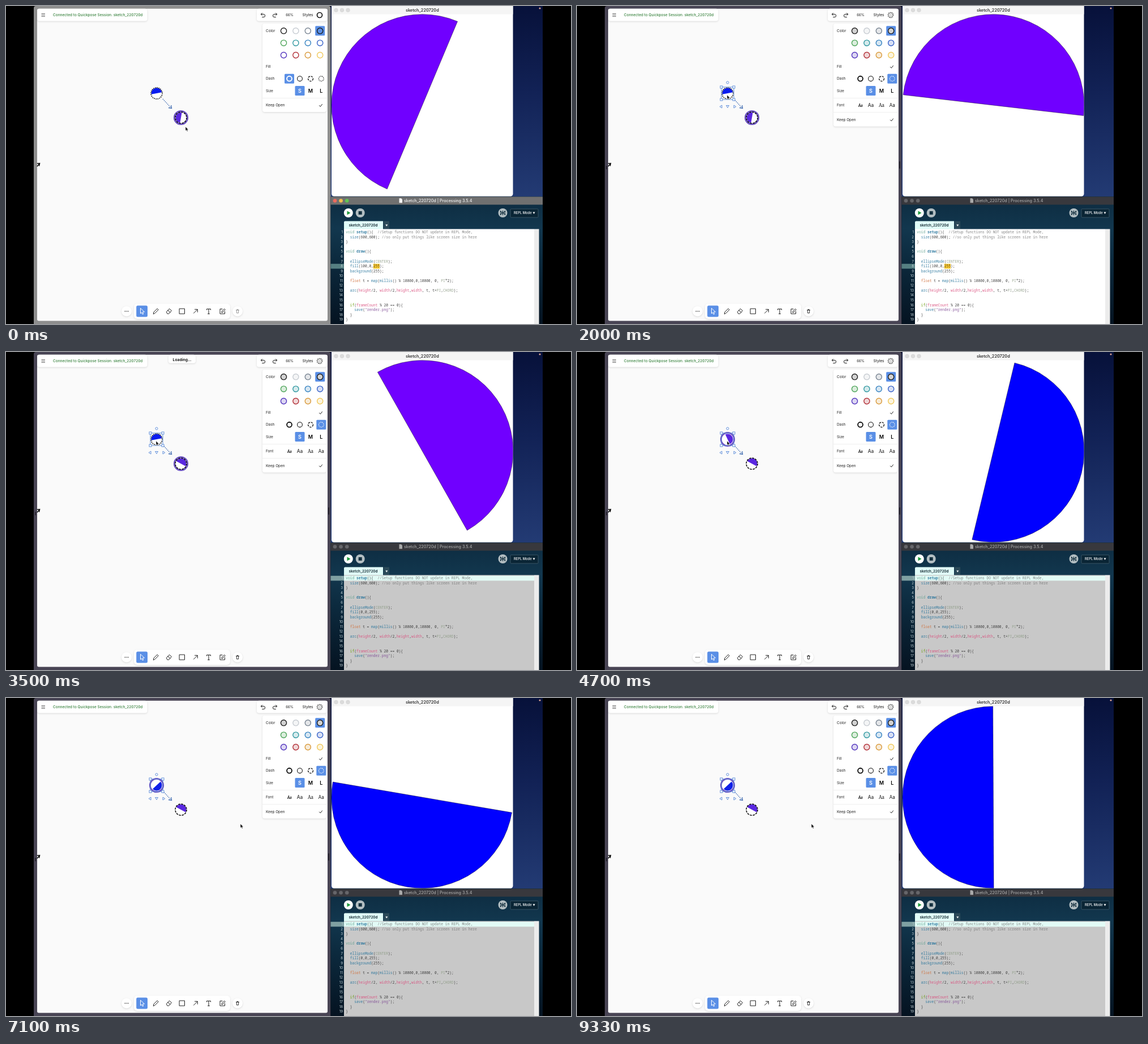
An HTML page that plays this animation: 998 by 561 pixels, repeating every 9.47 s.

```html
<!DOCTYPE html>
<html lang="en">
<head>
<meta charset="utf-8">
<title>Sketch session</title>
<style>
html, body { margin: 0; height: 100%; overflow: hidden; background: #000; }
svg { display: block; width: 998px; height: 561px; font-family: Inter, sans-serif; }
text { white-space: pre; }
.mid { text-anchor: middle; }
.code { font: 6.22px "Noto Sans Mono", monospace; opacity: .88; }
.panel { fill: #fff; filter: drop-shadow(0 1px 1.5px #0002); }
.line { fill: none; stroke: #222; stroke-width: 1; stroke-linecap: round; stroke-linejoin: round; }
.swatch { fill: none; stroke: currentColor; stroke-width: 1.4; }
.select .swatch { fill: color-mix(in srgb, currentColor 20%, #fff); }
.frame { fill: #8e8e8e; }
.select .frame { fill: #484454; }
.bar { fill: #707070; }
.select .bar { fill: #38383d; }
.barText { fill: #f4f4f4; }
.select .barText { fill: #aaa; }
.trash { stroke: #999; }
.select .trash { stroke: #333; }
.editor { fill: #fff; }
.reload .editor { fill: #c8c8c8; }
svg:not(.select) .ifSelect, svg.select .unlessSelect,
svg:not(.reload) .ifReload, svg.reload .unlessReload,
svg:not(.swap) .ifSwap, svg.swap .unlessSwap,
svg:not(.loading) .ifLoading { display: none; }
</style>
</head>
<body>
<svg id="stage" viewBox="0 0 998 561"></svg>
<script>
const LOOP = 9470, BLUE = '#5a8fe6', PURPLE = '#7000ff';
const stage = document.getElementById('stage');

const rect = (x, y, w, h, fill, extra = '') =>
  `<rect x="${x}" y="${y}" width="${w}" height="${h}" fill="${fill}" ${extra}/>`;
const circle = (x, y, r, extra = '') => `<circle cx="${x}" cy="${y}" r="${r}" ${extra}/>`;
const path = (d, extra = 'class="line"') => `<path d="${d}" ${extra}/>`;
const text = (x, y, s, size, extra = '') =>
  `<text x="${x}" y="${y}" font-size="${size}" ${extra}>${s}</text>`;
const group = (cls, ...parts) => `<g class="${cls}">${parts.join('')}</g>`;
const panel = (x, y, w, h, rx = 4) => rect(x, y, w, h, '#fff', `class="panel" rx="${rx}"`);

// Half disc running clockwise from the given angle, closed by its chord.
function halfDisc(x, y, r, degrees) {
  const a = degrees * Math.PI / 180, dx = r * Math.cos(a), dy = r * Math.sin(a);
  return `M${x + dx} ${y + dy}A${r} ${r} 0 0 1 ${x - dx} ${y - dy}Z`;
}

function desktop() {
  return `<defs>
    <linearGradient id="sky" x2="0" y2="1"><stop stop-color="#07113a"/><stop offset=".45" stop-color="#122256"/><stop offset="1" stop-color="#233b74"/></linearGradient>
    <linearGradient id="teal" x2="0" y2="1"><stop stop-color="#0d2b40"/><stop offset=".25" stop-color="#12374e"/><stop offset=".5" stop-color="#0c2a3e"/><stop offset="1" stop-color="#051321"/></linearGradient>
  </defs>` + rect(0, 0, 998, 561, '#000') + rect(573, 0, 375, 338, 'url(#sky)') +
    circle(943, 4, 1.6, 'fill="#d8a090"');
}

function stylePanel() {
  const colors = ['#1d1d1d', '#c6cbd1', '#788492', '#1d1d1d', '#4aa356', '#2f97a0', '#3280c0', '#3560c8',
    '#5133bd', '#b23038', '#d99a3c', '#f0c85c'];
  const swatches = colors.map((c, i) =>
    circle(490.5 + i % 4 * 21.4, 43.8 + (i >> 2) * 21.4, 5.1, `class="swatch" color="${c}"`)).join('');
  const label = (y, s) => text(459, y + 2.2, s, 6.4, 'fill="#222"');
  const check = y => path(`M553.5 ${y}l1.8 2 3.2-4.2`);
  const ring = (x, width, dash = '', color = '#111') =>
    circle(x, 128.2, 4.4, `fill="none" stroke="${color}" stroke-width="${width}" stroke-dasharray="${dash}"`);
  const square = (x, y) => rect(x - 8.5, y - 8.5, 17, 17, BLUE, 'rx="1.5"');
  const aa = (x, font, size = 8) =>
    text(x, 178, 'Aa', size, `class="mid" fill="#111" style="font-family:${font}"`);
  const divider = y => rect(453, y, 113, .7, '#e9e9e9');
  return group('unlessSelect', panel(453, 31, 113, 156)) +
    group('ifSelect', panel(453, 31, 113, 181.5)) +
    label(43.5, 'Color') + square(554.7, 43.8) + swatches +
    label(107, 'Fill') + label(128, 'Dash') + label(149.5, 'Size') + square(519, 149.5) + divider(162) +
    text(519, 153, 'S', 9, 'class="mid" font-weight="600" fill="#fff"') +
    text(538, 153, 'M', 9, 'class="mid" font-weight="600"') +
    text(556.8, 153, 'L', 9, 'class="mid" font-weight="600"') +
    ring(519, 1.1) + ring(538, 1.4, '3.4 1.8') +
    group('unlessSelect', square(500.5, 128.2), ring(500.5, 2, '', '#fff'), ring(556.8, 1.4, '1.2 1.5'),
      label(175, 'Keep Open'), check(175.5)) +
    group('ifSelect', ring(500.5, 1.9), square(556.8, 128.2), ring(556.8, 1.4, '1.2 1.5', '#fff'),
      check(107.5), label(175, 'Font'), aa(500.8, 'Lato,sans-serif;font-weight:bold;font-style:italic', 6.5),
      aa(519, 'Inter,sans-serif', 8.4), aa(538, 'Noto Serif,serif'), aa(556.8, 'Roboto,sans-serif', 8.4),
      divider(187), label(200.5, 'Keep Open'), check(201));
}

function toolbar() {
  return circle(213, 538.5, 9, 'class="panel"') + panel(226, 525, 170, 27, 6) + circle(409, 538.5, 9, 'class="panel"') +
    [210.3, 213, 215.7].map(x => circle(x, 538.5, .7)).join('') +
    rect(230.2, 528.6, 19.8, 19.8, BLUE, 'rx="2.5"') +
    path('M237.5 533.5v9l2-1.8 1.7 3.3 1.6-.8-1.6-3.2 2.9-.3z', 'class="line" style="stroke:#fff"') +
    path('M260.3 543l.7-3 6.2-6.2 2 2-6.2 6.3zM283.5 539.5l5-5.5 4 3.5-5 5.5h-2zM286 537l4 3.5') +
    rect(306.5, 534, 9, 9, 'none', 'class="line"') +
    path('M331.5 542l6.8-6.8m-4.8 0h4.8v4.8M354.5 536v-1.5h7v1.5M358 534.5v8.5m-1.5 0h3') +
    path('M382 534.5h-4v8.5h8.5v-4M381 540.5l.4-2 4.2-4.4 1.6 1.6-4.3 4.3z') +
    path('M406.5 536.5h5m-3.5 0v-1.2h2v1.2m-2.8 0l.3 5.2h3l.3-5.2', 'class="line trash" stroke-width=".8"');
}

function nodes() {
  const thumb = (x, y, id) => circle(x, y, 10, 'fill="#fff"') + `<path id="${id}"/>`;
  const halo = (x, y) => circle(x, y, 11.7, 'fill="none" stroke="#6d55c2" stroke-width="2.8"');
  const dots = circle(266, 154, 10, 'fill="none" stroke="#111" stroke-width="1.8" stroke-dasharray="1.5 1.64"');
  const dashes = circle(309, 197, 10, 'fill="none" stroke="#111" stroke-width="1.6" stroke-dasharray="3.6 1.63"');
  const handles = [[255, 143], [277, 143], [255, 165], [277, 165]]
    .map(([x, y]) => rect(x - 2, y - 2, 4, 4, '#fff')).join('');
  return path('M277 164l14 15', 'fill="none" stroke="#3f6bb0" stroke-width="1.4" stroke-dasharray="1.4 1.6"') +
    path('M287 179.5l5.5 1-.8-5.5', 'fill="none" stroke="#3f6bb0" stroke-width="1.3"') +
    thumb(266, 154, 'parent') + group('unlessSwap', dots) + thumb(309, 197, 'child') +
    group('ifSwap', halo(266, 154)) + group('unlessSwap', halo(309, 197)) + dashes +
    `<g class="ifSelect" fill="none" stroke="#5587d8" stroke-width=".9">` +
    rect(255, 143, 22, 22, 'none') + handles + circle(266, 135, 2.1, 'fill="#fff"') +
    path('M256 175v5l-4-2.5zM277 175v5l4-2.5zM263.5 175.5h5l-2.5 4z', '') + '</g>';
}

function board() {
  return rect(49, 0, 524.5, 565, '#000', 'class="frame" rx="4"') +
    group('ifSelect', rect(569, 274, 2, 13, '#282530', 'rx="1"'), rect(51, 282, 2, 6, '#282530')) +
    rect(55, 4.8, 513, 550.7, '#fafafa', 'rx="3"') +
    path('M55 283l4.5-5.5m-4.5.3l4.5-.3-1 4.8', 'fill="none" stroke="#111" stroke-width="1.6"') +
    nodes() + panel(55, 4.8, 194.5, 21.7) + panel(443, 4.8, 124.5, 21.7) +
    path('M62.5 13.5h6.5m-6.5 2.5h6.5m-6.5 2.5h6.5', 'stroke="#444" stroke-width=".8"') +
    text(83, 18.3, 'Connected to Quickpose Session: sketch_220720d', 6.5, 'fill="#38823e" font-weight="500"') +
    path('M450.5 14.5h4.5a2.6 2.6 0 0 1 0 5.2h-2.5M452.5 12.3l-2.2 2.2 2.2 2.2M478.5 14.5h-4.5a2.6 2.6 0 0 0 0 5.2h2.5M476.5 12.3l2.2 2.2-2.2 2.2') +
    text(501, 18.3, '66%', 6.2, 'class="mid" fill="#222"') + text(533, 18.3, 'Styles', 6.6, 'class="mid" fill="#111"') +
    group('unlessSelect', circle(554, 16, 4.5, 'fill="none" stroke="#111" stroke-width="1.7"')) +
    group('ifSelect', circle(554, 16, 4.5, 'fill="#ddd" stroke="#222" stroke-width="1.5" stroke-dasharray="1.3 1.5"')) +
    stylePanel() + toolbar() +
    group('ifLoading', panel(287, 4.8, 48, 15), text(311, 16, 'Loading...', 6.8, 'class="mid" font-weight="600"'));
}

function sketchWindow() {
  return `<clipPath id="win">${rect(575, -4, 320.5, 339.7, '#fff', 'rx="4.5"')}</clipPath><g clip-path="url(#win)">` +
    rect(575, 0, 321, 336, '#fff') + rect(575, 0, 321, 14.5, '#f5f5f5') +
    [583, 593.5, 604].map(x => circle(x, 7.3, 3.3, 'fill="#dcdcdc" stroke="#cacaca" stroke-width=".5"')).join('') +
    text(735.3, 9.9, 'sketch_220720d', 7.3, 'class="mid" fill="#333" font-weight="600"') +
    '<path id="disc" stroke="#000" stroke-opacity=".7" stroke-width=".6"/></g>';
}

const wordColors = [
  [/^\/\//, '#777'], [/^"/, '#7d4793'], [/^void$/, '#5d9f8d'], [/^float$/, '#d0703c'], [/^if$/, '#669900'],
  [/^(CENTER|PI|CHORD)$/, '#8b9a83'], [/^(height|width|frameCount)$/, '#d94a7a'],
  [/^(setup|draw|size|ellipseMode|fill|background|map|millis|arc|save)$/, '#1f6f98'],
];
function codeLine(line, y) {
  const spans = line.match(/\/\/.*|"[^"]*"|\w+|[^\w"/]+|./g).map(word => {
    const color = (wordColors.find(([re]) => re.test(word)) || [0, '#333'])[1];
    const bold = /^(setup|draw)$/.test(word) ? ' font-weight="bold"' : '';
    return `<tspan fill="${color}"${bold}>${word}</tspan>`;
  }).join('');
  return `<text class="code" x="600.3" y="${y}">${spans}</text>`;
}

function editorWindow() {
  const source = `void setup(){  //Setup functions DO NOT update in REPL Mode,
  size(600,600); //so only put things like screen size in here
}

void draw(){

  ellipseMode(CENTER);
  fill(100,0,255);
  background(255);

  float t = map(millis() % 10000,0,10000, 0, PI*2);

  arc(height/2, width/2,height,width, t, t+PI,CHORD);


  if(frameCount % 20 == 0){
    save("render.png");
  }
}`.split('\n');
  const lineY = i => 401.2 + i * 8.56;
  const numbers = source.map((_, i) =>
    text(595, lineY(i), i + 1, 6, 'text-anchor="end" fill="#c5d5da"')).join('');
  const lines = source.map((line, i) => {
    if (!line) return '';
    const out = codeLine(line, lineY(i));
    return !line.includes('fill') ? out : group('unlessReload', out) +
      group('ifReload', codeLine(line.replace('100', '0'), lineY(i)));
  }).join('');
  const lights = ['#ed6a5e', '#f5bf4f', '#61c554'];
  return rect(573.5, 336, 374.5, 225, 'url(#teal)') + rect(573.5, 336.5, 374.5, 14, '#000', 'class="bar"') +
    lights.map((c, i) => {
      const x = 581 + i * 10.6;
      return group('unlessSelect', circle(x, 343.5, 3.3, `fill="${c}"`)) +
        group('ifSelect', circle(x, 343.5, 3.3, 'fill="#66666a"'));
    }).join('') +
    path('M694.5 339.3h3.5l2 2v6h-5.5z', 'class="barText"') +
    text(703, 346, 'sketch_220720d | Processing 3.5.4', 7.15, 'class="barText" font-weight="500"') +
    circle(604.8, 365, 8, 'fill="#fff"') + path('M602.5 361.5v7l6-3.5z', 'fill="#1e9a3c"') +
    circle(625.7, 365, 8, 'fill="#b3bec2"') + rect(622.7, 362, 6, 6, '#14303f') +
    circle(877.5, 365, 8, 'fill="#b3bec2"') +
    path('M877.5 361v8m-1-4l-3-3v2.5m3 .5l-3 3v-2.5m5-.5l3-3v2.5m-3 .5l3 3v-2.5', 'fill="none" stroke="#14303f" stroke-width="1.2"') +
    rect(891, 358, 49, 15, '#0a2535', 'rx="1.5" stroke="#4d6673" stroke-width=".7"') +
    text(897, 367.2, 'REPL Mode', 5.8, 'fill="#fff" font-weight="500"') +
    path('M930.5 363.5h4l-2 3.5z', 'fill="#fff"') +
    path('M597 394v-12.5q0-2 2-2h67v14.5z', 'fill="#e0fcf8"') +
    text(631, 389.2, 'sketch_220720d', 6.3, 'class="mid" fill="#10232e" font-weight="600"') +
    rect(667.3, 379.5, 9.7, 14, '#2b4a59') + path('M670.3 385.5h4l-2 3.2z', 'fill="#fff"') +
    rect(597, 393.5, 336, 168, '#fff', 'class="editor"') + rect(933, 393.5, 8.5, 168, '#ececec') +
    group('unlessReload', rect(573.5, 454.8, 23.5, 8.6, '#557f82'), rect(648.7, 454.8, 11.4, 8.6, '#ffcb2e')) +
    group('ifReload', rect(573.5, 394.8, 23.5, 8.6, '#7fa0a2'), rect(597, 394.8, 336, 8.6, '#e2fbf6')) +
    numbers + lines;
}

stage.innerHTML = desktop() + board() + sketchWindow() + editorWindow() +
  '<path id="cursor" d="M0 0v7.2l1.7-1.5 1.2 2.6 1.3-.6-1.2-2.5h2.3z" fill="#111" stroke="#fff" stroke-width=".5"/>';

const [disc, parent, child, cursor] = ['disc', 'parent', 'child', 'cursor'].map(id => document.getElementById(id));
const cursorKeys = [[0, 317, 213], [1000, 265, 157], [5000, 265, 157], [5600, 390.5, 207.5], [6000, 414, 222], [LOOP, 414, 222]];

const angleAt = t => 112.8 + Math.min(t, 2000) * .0369 + Math.max(t - 2000, 0) * .0359;

function cursorAt(t) {
  const i = cursorKeys.findIndex(key => key[0] > t);
  const [t0, x0, y0] = cursorKeys[i - 1], [t1, x1, y1] = cursorKeys[i];
  const k = (t - t0) / (t1 - t0);
  return [x0 + (x1 - x0) * k, y0 + (y1 - y0) * k];
}

function paint(el, x, y, r, degrees, color) {
  el.setAttribute('d', halfDisc(x, y, r, degrees));
  el.setAttribute('fill', color);
}

function render(now) {
  const time = now % LOOP;
  const t = time >= 9330 ? 9330 : Math.min(Math.floor(time / 100) * 100, 9200);
  const swapped = t >= 4300;
  stage.classList.toggle('select', t >= 1200);
  stage.classList.toggle('reload', t >= 3200);
  stage.classList.toggle('loading', t >= 3200 && !swapped);
  stage.classList.toggle('swap', swapped);

  paint(disc, 735.4, 175.1, 160.4, angleAt(t), swapped ? '#00f' : PURPLE);
  if (t >= 5800) paint(parent, 266, 154, 9.5, 317, '#1020e8');
  else if (swapped) paint(parent, 266, 154, 9.5, 245, '#5a28e0');
  else paint(parent, 266, 154, 9.5, 169, '#0a1cf0');
  paint(child, 309, 197, 9.5, t >= 2800 ? 208 : 100, '#5a28e0');
  cursor.setAttribute('transform', `translate(${cursorAt(t)})`);
  requestAnimationFrame(() => render(performance.now()));
}
render(performance.now());
</script>
</body>
</html>
```
